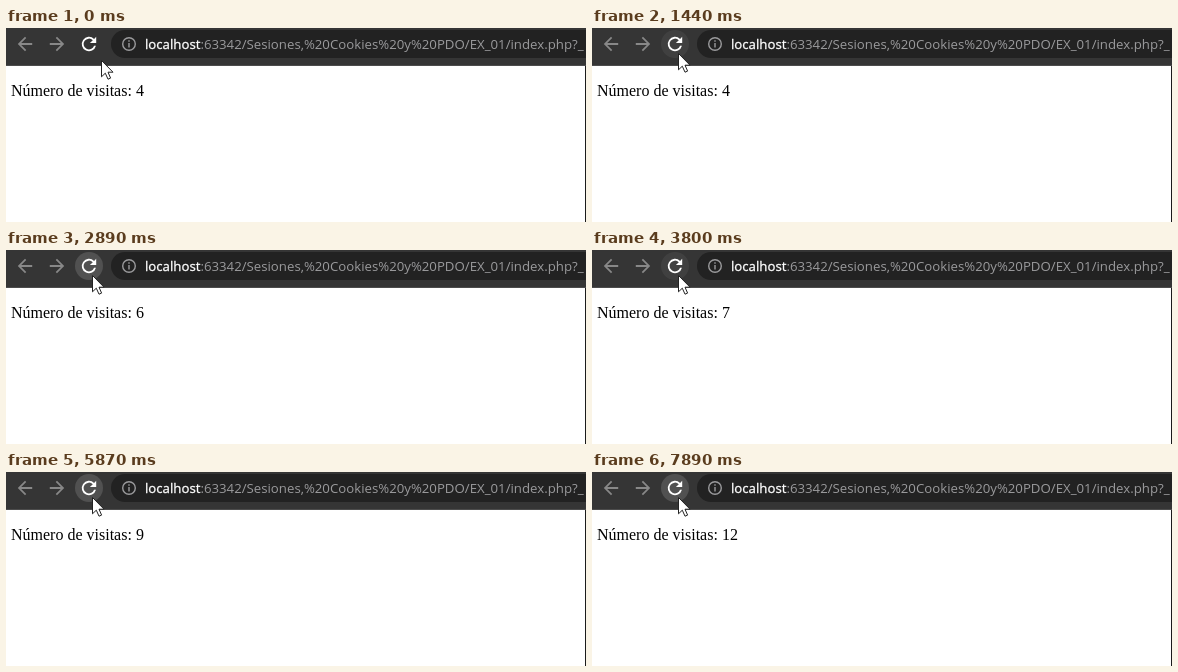
Animation, 580 px wide and 194 px high, one loop 7990 ms. Source, as an HTML page:

```html
<!DOCTYPE html>
<html lang="es">
<head>
<meta charset="utf-8">
<style>
html, body { margin: 0; width: 100%; height: 100%; overflow: hidden; background: #fff; }
svg { display: block; width: 580px; height: 194px; }
.url { font: 13.23px "Open Sans", "Noto Sans", sans-serif; fill: #9a9a9c; }
.host { fill: #fff; stroke: #fff; stroke-width: .3; }
.page { font: 16px "Liberation Serif", "Times New Roman", serif; fill: #000; }
</style>
</head>
<body>
<svg viewBox="0 0 580 194">
  <rect width="580" height="194" fill="#fff"/>
  <rect width="580" height="38" fill="#353535"/>
  <rect y="37" width="580" height="1" fill="#4c4c4c"/>
  <rect x="105" y="2" width="500" height="28" rx="14" fill="#222"/>
  <rect x="579" y="38" width="1" height="156" fill="#1b1b1b"/>

  <circle id="hover" cx="83" cy="16" r="14" fill="#fff"/>
  <!-- toolbar icons on a 24 unit grid -->
  <path transform="translate(19 16) scale(.9) translate(-12 -12)" fill="#888"
    d="M20 11H7.8L13.4 5.4 12 4 4 12 12 20 13.4 18.6 7.8 13H20Z"/>
  <path transform="translate(51 16) scale(.9) translate(-12 -12)" fill="#888"
    d="M12 4 10.6 5.4 16.2 11H4V13H16.2L10.6 18.6 12 20 20 12Z"/>
  <path transform="translate(83 16) scale(.9) translate(-12 -12)" fill="#fff"
    d="M17.65 6.35A8 8 0 1 0 19.73 14H17.65A6 6 0 1 1 16.22 7.78L13 11H20V4Z"/>

  <g fill="none" stroke="#9a9a9c" stroke-width="1.4">
    <circle cx="123" cy="16" r="6.3"/>
    <path d="M123 15V19.5M123 12.3V13.8"/>
  </g>
  <text class="url" x="139" y="21"><tspan class="host">localhost</tspan>:63342/Sesiones,%20Cookies%20y%20PDO/EX_01/index.php?_</text>

  <text class="page" x="5" y="68">Número de visitas: <tspan id="count">4</tspan></text>
  <path id="cursor" d="M.5 .5V16.8L4.3 13.2L7 19.2L9.6 18.1L7 12.2H12Z" fill="#fff" stroke="#222"/>
</svg>
<script>
const LOOP = 7990;
const FIRST = 4;
const reloads = [1740, 2560, 3380, 4180, 5080, 5900, 6480, 7560];
const PRESS = 60, RELEASE = 360;

const $ = id => document.getElementById(id);
const hover = $('hover'), count = $('count'), cursor = $('cursor');
const clamp = v => Math.max(0, Math.min(1, v));
const ease = v => v * v * (3 - 2 * v);

function draw(t) {
  const k = ease(clamp((t - 100) / 600));
  const x = 95 - 9 * k, y = 32 - 7 * k;
  cursor.setAttribute('transform', `translate(${Math.round(x)} ${Math.round(y)})`);

  const over = Math.hypot(x - 83, y - 16) < 14;
  const pressed = reloads.some(r => t >= r - PRESS && t < r + RELEASE);
  hover.setAttribute('opacity', pressed ? 0.14 : over ? 0.06 : 0);

  count.textContent = FIRST + reloads.filter(r => t >= r).length;
}

const start = performance.now();
function tick() {
  draw((performance.now() - start) % LOOP);
  requestAnimationFrame(tick);
}
draw(0);
requestAnimationFrame(tick);
</script>
</body>
</html>
```
